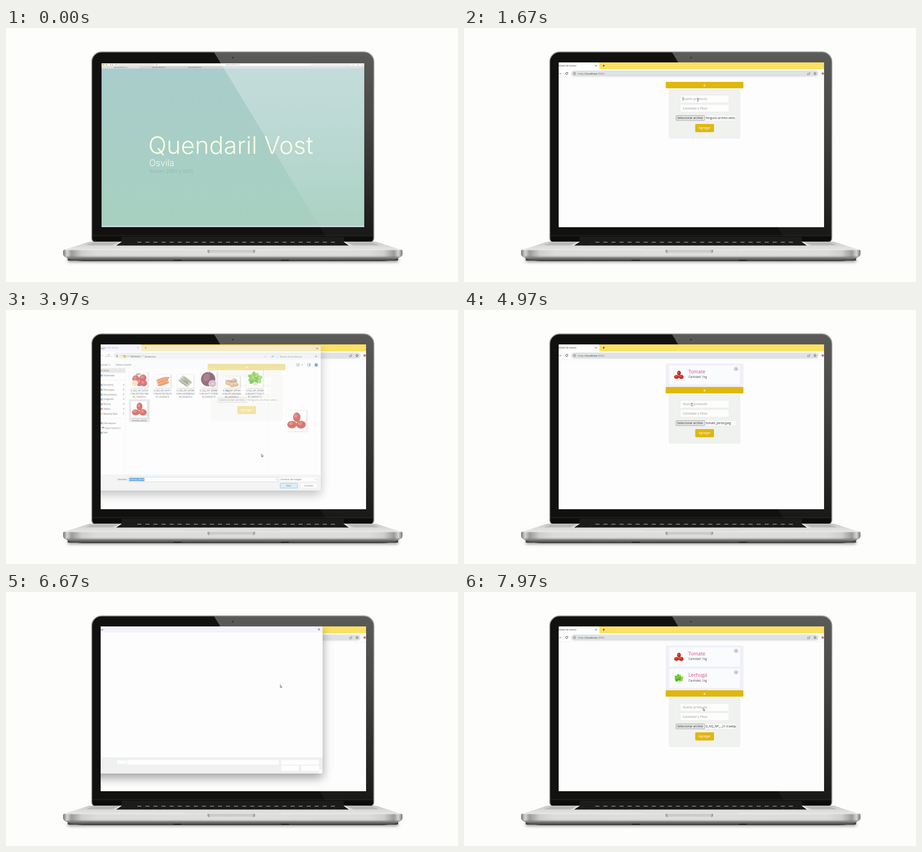
Write an HTML page with a canvas that moves like this. It is 998 px wide and 561 px high and loops after 8000 ms.

```html
<!DOCTYPE html>
<html lang="es">
<head>
<meta charset="utf-8">
<title>Listado de tareas</title>
<style>
html, body { margin: 0; width: 100%; height: 100%; overflow: hidden; background: #fdfdfc; }
canvas { display: block; width: 998px; height: 561px; }
</style>
</head>
<body>
<canvas id="stage"></canvas>
<script>
const W = 998, H = 561, LOOP = 8000;
const dpr = window.devicePixelRatio || 1;
const UI = '"Open Sans", "Noto Sans", sans-serif';
const THIN = 'Inter, Roboto, sans-serif';
const GOLD = '#e0b70e';

function prepare(canvas) {
  canvas.width = W * dpr;
  canvas.height = H * dpr;
  const ctx = canvas.getContext('2d');
  ctx.scale(dpr, dpr);
  return ctx;
}
const stage = prepare(document.getElementById('stage'));
const layer = document.createElement('canvas');
const layerCtx = prepare(layer);
let g = stage;

const clamp = v => Math.min(1, Math.max(0, v));
const phase = (t, a, b) => clamp((t - a) / (b - a));
const smooth = p => p * p * (3 - 2 * p);

function rect(x, y, w, h, fill, r = 0, stroke, lw = 0.6) {
  g.beginPath();
  g.roundRect(x, y, w, h, r);
  if (fill) { g.fillStyle = fill; g.fill(); }
  if (stroke) { g.strokeStyle = stroke; g.lineWidth = lw; g.stroke(); }
}
function poly(points, fill) {
  g.beginPath();
  points.forEach(([x, y]) => g.lineTo(x, y));
  g.closePath();
  g.fillStyle = fill;
  g.fill();
}
function line(color, lw, ...points) {
  g.beginPath();
  points.forEach(([x, y], i) => i ? g.lineTo(x, y) : g.moveTo(x, y));
  g.strokeStyle = color;
  g.lineWidth = lw;
  g.stroke();
}
function oval(x, y, rx, ry, fill, rot = 0) {
  g.beginPath();
  g.ellipse(x, y, rx, ry, rot, 0, Math.PI * 2);
  g.fillStyle = fill;
  g.fill();
}
function ring(x, y, r, color, lw, a = 0, b = Math.PI * 2) {
  g.beginPath();
  g.arc(x, y, r, a, b);
  g.strokeStyle = color;
  g.lineWidth = lw;
  g.stroke();
}
function text(s, x, y, size, color, align = 'left', weight = 400, family = UI) {
  g.font = `${weight} ${size}px ${family}`;
  g.textAlign = align;
  g.textBaseline = 'alphabetic';
  g.fillStyle = color;
  g.fillText(s, x, y + size * 0.36);
}
function ramp(x0, y0, x1, y1, ...stops) {
  const grad = g.createLinearGradient(x0, y0, x1, y1);
  stops.forEach(([p, c]) => grad.addColorStop(p, c));
  return grad;
}
function chevron(x, y, color = '#555') {
  line(color, 0.6, [x - 1.6, y - 0.8], [x, y + 0.8], [x + 1.6, y - 0.8]);
}
function arrowIcon(x, y, dx, dy, color) {
  line(color, 0.7, [x - 2.6 * dx, y - 2.6 * dy], [x + 2.6 * dx, y + 2.6 * dy]);
  const tx = x + 2.6 * dx, ty = y + 2.6 * dy;
  line(color, 0.7, [tx - 2 * dx + 2 * dy, ty - 2 * dy + 2 * dx], [tx, ty],
    [tx - 2 * dx - 2 * dy, ty - 2 * dy - 2 * dx]);
}
function cross(x, y, r, color, lw) {
  line(color, lw, [x - r, y - r], [x + r, y + r]);
  line(color, lw, [x + r, y - r], [x - r, y + r]);
}
function plus(x, y, r, color, lw) {
  line(color, lw, [x - r, y], [x + r, y]);
  line(color, lw, [x, y - r], [x, y + r]);
}
function reload(x, y, r, color, lw) {
  ring(x, y, r, color, lw, 0.4, 5.4);
  poly([[x + r + 0.5, y - r - 0.3], [x + r + 0.5, y - 0.3], [x + r - 2, y - 0.3]], color);
}

// Produce pictures, drawn in a box about 36 units wide around the centre.
const produce = {
  apple() {
    [[-8, -2, 8], [8, -4, 8], [0, 6, 9], [10, 8, 7.5]].forEach(([x, y, r]) => {
      oval(x, y, r, r * 0.95, '#c5283a');
      oval(x - r * 0.25, y - r * 0.25, r * 0.5, r * 0.4, '#dc5a58');
    });
    oval(-10, 8, 7, 7, '#eed9a4');
    line('#6b4a2a', 1, [-8, -9], [-6, -14]);
    oval(-2, -12, 5, 2, '#78a54a', -0.3);
  },
  carrot() {
    for (let i = 0; i < 5; i++) {
      oval(-1 + i * 0.9, -6 + i * 3.2, 15, 2.6, i % 2 ? '#f08a3c' : '#e2692a', -0.28);
    }
    oval(14, -8, 4, 2, '#6f9c4b', -0.5);
  },
  asparagus() {
    for (let i = 0; i < 6; i++) {
      oval(-6 + i * 2.3, 5 - i * 2.1, 15, 1.8, i % 2 ? '#a7b98a' : '#6d8560', 0.65);
    }
    oval(2, 2, 2, 6, '#8b567a', -0.8);
  },
  onion() {
    oval(-1, -1, 16, 16, '#5d1f38');
    oval(-5, -5, 7, 9, '#7d3b54', 0.5);
    oval(9, 9, 9, 8, '#ead3de');
    ring(9, 9, 6, '#93506f', 1.2);
    ring(9, 9, 3, '#93506f', 0.9);
    line('#a58369', 2, [0, -15], [3, -19]);
  },
  onions() {
    [[-8, 1, 8], [6, -3, 8], [2, 7, 7], [11, 6, 6]].forEach(([x, y, r]) => {
      oval(x, y, r, r * 0.85, '#d6a36e');
      oval(x - 2, y - 2, r * 0.5, r * 0.4, '#e8c59a');
    });
  },
  lettuce() {
    for (let i = 0; i < 17; i++) {
      const a = i * 2.4, r = 3.4 * Math.sqrt(i);
      oval(Math.cos(a) * r, Math.sin(a) * r * 0.75 - 1, 5.2, 4,
        ['#6fc22f', '#8fd749', '#4ea823'][i % 3], a);
    }
    oval(1, 11, 5, 4, '#cfe8a3');
  },
  tomato() {
    [[1, -7, 7, 9], [-8, 7, 9, 7], [9, 7, 9, 7.5]].forEach(([x, y, rx, ry]) => {
      oval(x, y, rx, ry, '#c92a22');
      oval(x - 2, y - 2, rx * 0.45, ry * 0.4, '#e2594a');
      oval(x + 1, y - ry * 0.75, 3.5, 1.1, '#52752f', 0.2);
    });
  }
};
function picture(kind, x, y, scale) {
  g.save();
  g.translate(x, y);
  g.scale(scale, scale);
  produce[kind]();
  g.restore();
}

function laptop() {
  g.fillStyle = '#fdfdfc';
  g.fillRect(0, 0, W, H);

  g.save();
  g.shadowColor = 'rgba(0,0,0,.55)';
  g.shadowBlur = 7 * dpr;
  g.shadowOffsetY = 2 * dpr;
  rect(136, 508, 730, 6, '#444', 3);
  g.restore();

  // Lid
  rect(189, 52.5, 623.5, 421, '#11110f', [22, 22, 9, 9], '#b4b4b2', 2);
  rect(191, 54.5, 619.5, 417, null, [20, 20, 7, 7], '#2a2a28', 1);
  glare(0.31, 190, 53.5, 811, 460);
  oval(501, 65.5, 2, 2, '#3d3d40');
  oval(501, 65.5, 0.9, 0.9, '#27293a');
  rect(191, 457.5, 620, 1, '#2f2f2d');
  rect(255, 461, 491, 11, '#1c1c1a');
  rect(192, 462, 63, 9, '#0c0c0a');
  rect(746, 462, 63, 9, '#0c0c0a');

  // Deck and keyboard
  poly([[184, 472], [817, 472], [873, 490], [128, 490]],
    ramp(0, 472, 0, 490, [0, '#c4c4c3'], [0.5, '#d9d9d8'], [1, '#e6e6e5']));
  poly([[194, 473.5], [247, 473.5], [235, 480], [176, 480]], '#b9b9b8');
  poly([[754, 473.5], [807, 473.5], [824, 480], [767, 480]], '#b9b9b8');
  poly([[252, 472], [749, 472], [762, 481], [239, 481]], '#e8e8e7');
  poly([[256, 472], [745, 472], [757, 480.5], [243, 480.5]], '#1b1b1a');
  for (let x = 290; x < 722; x += 17.8) rect(x, 472.5, 9, 1.2, '#b5b5b4');
  for (let x = 262; x < 740; x += 22) line('#3c3c3b', 0.6, [x, 474.5], [x - (501 - x) * 0.02, 480]);
  poly([[398, 481], [602, 481], [607, 490], [393, 490]], '#dededd');

  // Front edge
  g.beginPath();
  g.moveTo(128, 504);
  g.quadraticCurveTo(142, 514.5, 172, 515);
  g.lineTo(830, 515);
  g.quadraticCurveTo(860, 514.5, 873, 504);
  g.closePath();
  g.fillStyle = ramp(0, 504, 0, 515, [0, '#a2a2a1'], [0.5, '#6c6c6b'], [1, '#343433']);
  g.fill();
  rect(126, 489.5, 749.5, 16.5, ramp(126, 0, 875.5, 0,
    [0, '#777776'], [0.012, '#d5d5d4'], [0.025, '#9b9b9a'], [0.055, '#cfcfce'], [0.1, '#dcdcdb'],
    [0.5, '#dededd'], [0.9, '#dcdcdb'], [0.945, '#cfcfce'], [0.975, '#9b9b9a'], [0.988, '#d5d5d4'], [1, '#777776']),
    [4, 4, 7, 7]);
  rect(130, 489.5, 742, 1, '#f2f2f1');
  rect(134, 503.5, 734, 2.5, 'rgba(90,90,88,.25)', 2);
  rect(445, 490, 105, 8, ramp(445, 0, 550, 0, [0, '#8f8f8e'], [0.06, '#cbcbca'], [0.94, '#cbcbca'], [1, '#8f8f8e']), [0, 0, 5, 5]);
  rect(449, 496.5, 97, 1, '#ececeb');
  rect(370, 512, 18, 2, '#222');
  rect(607, 512, 18, 2, '#222');
}

function glare(alpha, left, top, right, bottom) {
  const edge = y => 459 + 0.606 * (y - 53);
  g.save();
  g.beginPath();
  g.roundRect(left, top, right - left, bottom - top, top < 60 ? [20, 20, 0, 0] : 0);
  g.clip();
  poly([[edge(top), top], [right, top], [right, bottom], [edge(bottom), bottom]],
    ramp(0, 53, 0, 460, [0, `rgba(255,255,255,${alpha})`], [0.35, `rgba(255,255,255,${alpha * 0.75})`],
      [1, `rgba(255,255,255,${alpha * 0.1})`]));
  g.restore();
}

function welcome() {
  rect(211, 78, 580, 361.5, ramp(0, 90, 0, 437, [0, '#a9cdcb'], [1, '#a7d0c0']));
  rect(211, 78, 580, 6, '#f3f3f3');
  rect(211, 84, 580, 5.5, '#d0d2d1');
  rect(211, 84, 84, 5.5, '#dededd');
  ['#f0605a', '#f4bd4f', '#5fc454'].forEach((c, i) => oval(214.5 + i * 3.8, 81, 1.3, 1.3, c));
  rect(246, 79, 82, 4, '#e4e4e4', 1);
  rect(333, 79, 338, 4, '#fff', 1);
  rect(674, 79, 88, 4, '#e4e4e4', 1);
  [230, 234, 242, 331, 766, 776, 786].forEach(x => rect(x, 80, 1.8, 2, '#999'));
  text('www.yourwebsite.com', 501, 81, 2.9, '#444', 'center');
  [253, 337, 417].forEach(x => text('www.yourwebsite.com', x, 87, 2.8, '#555', 'center'));
  rect(211, 437, 580, 2.5, '#d9dfeb');
  text('Quendaril Vost', 314, 258.5, 53.5, '#fbfbe6', 'left', 300, THIN);
  text('Osvila', 316, 298, 19.5, '#fbfbea', 'left', 300, THIN);
  text('Screen 2880 x 1800', 316.5, 316, 10.3, '#8fb2ae', 'left', 300, THIN);
  glare(0.33, 211, 78, 791, 440);
}

function browser() {
  rect(209, 76, 586, 364, '#fdfdfd');
  rect(209, 76, 586, 15, '#fbe164');
  rect(190, 76, 109, 18, '#fdfdfd', 4);
  text('Listado de tareas', 248, 83.3, 5.3, '#444', 'right');
  cross(291.5, 83.3, 1.6, '#333', 0.8);
  plus(308.5, 83.3, 2.6, '#333', 0.9);
  rect(209, 91, 586, 19, '#fdfdfd');
  line('#e7e8ea', 0.6, [209, 110], [795, 110]);
  arrowIcon(212, 100.5, 1, 0, '#888');
  reload(226.8, 100.5, 2.5, '#333', 1);
  rect(236.5, 94, 546.5, 13.5, '#dfe2e3', 6.7);
  ring(244, 100.6, 2.6, '#555', 0.7);
  line('#555', 0.7, [244, 100.2], [244, 102]);
  line('#555', 0.7, [244, 99], [244, 99.6]);
  text('http://', 251.5, 100.6, 6, '#666');
  const x1 = 251.5 + g.measureText('http://').width;
  text('localhost', x1, 100.6, 6, '#333');
  text(':3000', x1 + g.measureText('localhost').width, 100.6, 6, '#777');
  line('#666', 0.7, [758.5, 99.5], [758.5, 103.2], [763, 103.2], [763, 101.5]);
  line('#666', 0.7, [760, 101.6], [761, 99.6], [764, 99.3]);
  line('#666', 0.7, [762.5, 97.6], [764.2, 99.3], [762.5, 101]);
  g.beginPath();
  for (let i = 0; i < 10; i++) {
    const a = i * Math.PI / 5 - Math.PI / 2, r = i % 2 ? 1.4 : 3.2;
    g.lineTo(775 + r * Math.cos(a), 100.8 + r * Math.sin(a));
  }
  g.closePath();
  g.strokeStyle = '#444';
  g.lineWidth = 0.7;
  g.stroke();
  oval(792, 100.5, 2.6, 2.6, '#e0666e');
}

function card(y, name, kind) {
  rect(453, y, 156.5, 43, '#fafbfd', 3, '#eceef3');
  picture(kind, 474, y + 21.5, 0.6);
  text(name, 495.5, y + 14.3, 10.7, '#d6458f');
  text('Cantidad: 1kg', 495.5, y + 26, 6.4, '#444');
  oval(600.7, y + 8, 5.3, 5, '#dbd6e2');
  text('x', 600.7, y + 7.7, 6, '#7c4265', 'center');
}

function field(y, value, hint, caret) {
  rect(477.3, y, 107.8, 17.2, '#fdfdfc', 1.8, '#dfe0e0');
  text(value || hint, 483, y + 8.5, 7.2, value ? '#444' : '#92969a');
  if (caret) {
    const x = 483.5 + (value ? g.measureText(value).width : 0);
    line('#333', 0.7, [x, y + 4], [x, y + 13]);
  }
}

const typed = (t, s, a, b) => s.slice(0, Math.floor(s.length * phase(t, a, b) + 1e-6));

function page(t) {
  const count = (t >= 4400) + (t >= 7800);
  const dy = [0, 51, 98][count];
  if (count) {
    rect(445.3, 118, 171.7, dy + 5, '#eff0f9', 2);
    card(122, 'Tomate', 'tomato');
    if (count > 1) card(169.2, 'Lechuga', 'lettuce');
  }
  rect(445.3, 119 + dy, 171.7, 14.3, GOLD, 2.5);
  plus(531, 127 + dy, 2.5, '#fff', 1);
  if (t < 1150) return;

  let name = '', qty = '';
  if (t < 4400) {
    name = typed(t, 'Tomate', 1750, 2000);
    qty = typed(t, '1kg', 2150, 2300);
  } else if (t < 7800) {
    name = typed(t, 'Lechuga', 5150, 5480);
    qty = typed(t, '1kg', 5750, 6000);
  }
  const within = (a, b) => t >= a && t < b;
  rect(453, 137.3 + dy, 156.5, 106.5, '#f0f2ef', 3.5, '#dfe2e6');
  field(148.2 + dy, name, 'Nuevo producto', within(1600, 2080) || within(5000, 5600));
  field(168.6 + dy, qty, 'Cantidad o Peso', within(2080, 2460) || within(5600, 6400));
  rect(467.3, 192.6 + dy, 133.5, 12.4, '#f9faf9', 2, '#e2e4e5');
  rect(468.2, 193.4 + dy, 63.3, 10.8, '#e9e9ea', 1.4, '#777', 0.7);
  text('Seleccionar archivo', 470.7, 198.7 + dy, 6.4, '#222');
  const file = t < 4100 ? 'Ninguno archivo selec.' : t < 7640 ? 'tomate_perita.jpeg' : 'D_NQ_NP_...21-V.webp';
  text(file, 533.5, 198.7 + dy, 6.35, '#333');
  rect(510.5, 212 + dy, 41.5, 18, GOLD, 2.2);
  text('Agregar', 531.2, 220.8 + dy, 7.4, '#fff', 'center');
}

const files = [
  ['apple', 'D_NQ_NP_62334', '7-MLA477641786', '40_102021-V', 0],
  ['carrot', 'D_NQ_NP_65411', '7-MLA418278223', '07_052020-V', 4],
  ['asparagus', 'D_NQ_NP_85786', '5-MLA495986022', '09_042022-V', 4],
  ['onion', 'D_NQ_NP_89088', '3-MLA477177936', '54_092021-V', 0],
  ['onions', 'D_NQ_NP_89384', '6-MLA418265968', '02_052020-V', 6],
  ['lettuce', 'D_NQ_NP_99368', '0-MLA477176217', '87_092021-V', -2]
];
const side = [
  ['Inicio', 132], ['NubeVado', 143], ['Escritorio', 164.3], ['Descargas', 175], ['Documentos', 185.8],
  ['Imágenes', 196.5], ['Música', 207.3], ['Vídeos', 218], ['Bautista Roel', 228.7],
  ['Este equipo', 250], ['Disco local (C:)', 260.8], ['Red', 271.5]
];
const sideColors = ['#e0934a', '#2f86d6', '#3aa0d8', '#3a9b74', '#6f8fae', '#3f8fd8', '#d8604a', '#8a58c0', '#f0c04a', '#4a90b8', '#555', '#3a8ec0'];

function thumb(kind, x, top, bottom, scale) {
  g.save();
  g.shadowColor = 'rgba(0,0,0,.3)';
  g.shadowBlur = 2.5 * dpr;
  g.shadowOffsetX = g.shadowOffsetY = 0.8 * dpr;
  rect(x - 18.5, top, 37, bottom - top, '#fff');
  g.restore();
  picture(kind, x, (top + bottom) / 2, scale);
}

function dialogBody(state) {
  const label = (s, x, y, color = '#222', align) => text(s, x, y, 5.1, color, align);
  rect(149, 76, 550, 325, '#fdfdfd', 3);
  rect(149, 76, 550, 13.5, '#f4f1fb', [3, 3, 0, 0]);
  label('Abrir', 215.3, 83, '#333', 'right');
  cross(691, 82.8, 2, '#222', 0.8);
  rect(149, 365, 550, 36, '#eff0f0', [0, 0, 3, 3]);
  if (state.loading) {
    [[245, 372, 20.5, 7.5], [267.5, 371, 335, 10.5], [607.5, 371, 83.5, 10.5], [607.5, 383.5, 39, 11.5],
      [652.5, 383.5, 39, 11.5], [691, 393, 7, 7]].forEach(b => rect(...b, '#fdfdfd'));
    return;
  }

  arrowIcon(217, 100.8, 1, 0, '#999');
  chevron(230.3, 100.8);
  arrowIcon(243, 100.8, 0, -1, '#333');
  rect(253.5, 93.8, 346.5, 14, '#fdfdfd', 1, '#e3e3e5');
  rect(257, 98.2, 6.6, 5.2, '#f3c44d', 0.8);
  rect(257, 97.4, 3, 2, '#dca22d', 0.6);
  label('›', 267, 100.5);
  label('Escritorio', 273, 100.8);
  label('›', 298.5, 100.5);
  label('productos', 305, 100.8);
  chevron(574.5, 100.8);
  reload(591, 100.8, 2, '#555', 0.6);
  rect(603.5, 93.8, 90.5, 14, '#fdfdfd', 1, '#e3e3e5');
  label('Buscar en productos', 608, 100.8, '#777');
  ring(688.6, 100.2, 1.6, '#444', 0.6);
  line('#444', 0.7, [687.4, 101.4], [685.6, 103.2]);

  rect(149, 112.5, 550, 14.3, '#f9fafb');
  label('Organizar', 222.5, 119.6, '#245', 'right');
  poly([[224.5, 118.8], [227.5, 118.8], [226, 120.6]], '#333');
  label('Nueva carpeta', 240, 119.6, '#245');
  rect(645.3, 117, 5.2, 4.6, null, 0.5, '#333', 0.7);
  poly([[655.8, 118.8], [658.8, 118.8], [657.3, 120.6]], '#333');
  rect(669.5, 117, 6, 5, '#fff', 0, '#246a9c', 0.8);
  rect(673, 117, 2.5, 5, '#56a3d4');
  oval(688.7, 119.4, 3.7, 3.7, '#0f75bd');
  text('?', 688.7, 119.3, 5, '#fff', 'center', 700);

  rect(149, 127, 112, 10.3, '#dcdcdc');
  side.forEach(([name, y], i) => {
    rect(i === 10 ? 208.5 : 206, y - 2, i === 10 ? 5.5 : 4, i === 10 ? 2.5 : 4.5, sideColors[i]);
    label(name, i === 10 ? 216 : 212, y);
    if (i > 1 && i < 9) {
      oval(257.6, y - 0.6, 1.5, 1, '#777', -0.8);
      line('#777', 0.6, [257, y], [255.3, y + 1.8]);
    }
  });
  [153.5, 239.3].forEach(y => line('#e4e4e4', 0.7, [149, y], [257, y]));
  line('#ececec', 0.7, [261.5, 127], [261.5, 365]);

  if (state.hover >= 0) rect(269 + state.hover * 51.7, 129.5, 47, 66.5, '#e4f1fb');
  if (state.pick === 'lettuce') rect(527.5, 129.5, 47, 66.5, '#d9e6ef');
  files.forEach(([kind, a, b, c, drop], i) => {
    const x = 292.5 + i * 51.7;
    thumb(kind, x, 134 + drop * 1.9, 171, drop > 0 ? 0.9 : 1);
    [a, b, c].forEach((s, k) => label(s, x, 177 + k * 7.2, '#222', 'center'));
  });
  if (state.pick === 'tomato') rect(269.5, 196.5, 46.5, 51.5, '#dfe1e1');
  thumb('tomato', 292, 200.5, 238, 0.95);
  label('tomate_perita', 292.5, 244.2, '#222', 'center');

  if (state.pick) {
    line('#f0f0f0', 0.7, [582, 127], [582, 365]);
    g.save();
    g.translate(644, 245);
    g.scale(1.25, 1.25);
    thumb(state.pick, 0, -18.7, 18.7, 0.95);
    g.restore();
  } else {
    label('Seleccione el archivo del que desea obtener la', 641, 242.3, '#777', 'center');
    label('vista previa.', 641, 249.6, '#777', 'center');
  }

  label('Nombre:', 265, 376.3, '#222', 'right');
  rect(267.3, 371.2, 335.4, 10.3, '#fdfdfd', 0.5, '#80b4d0');
  chevron(598.7, 376.5);
  if (state.pick) {
    const s = state.pick === 'tomato' ? 'tomate_perita' : 'D_NQ_NP_993680-MLA47717621787_092021-V';
    g.font = `400 5.1px ${UI}`;
    rect(269.5, 372.8, g.measureText(s).width + 1, 7.2, '#1b79c6');
    label(s, 270, 376.3, '#fff');
  }
  rect(607.5, 371.2, 83.8, 10.3, '#fdfdfd', 0.5, '#d7d7d7');
  label('Archivos de imagen', 609.3, 376.4);
  chevron(688, 376.5);
  rect(608.2, 384.6, 38.6, 11, state.press ? '#c9e6f7' : '#fdfdfd', 1, '#3d93c8', 0.8);
  label('Abrir', 627.5, 390.1, '#222', 'center');
  rect(653, 384.6, 38.5, 11, '#fdfdfd', 1, '#d2d2d2');
  label('Cancelar', 672.2, 390.1, '#222', 'center');
  for (let i = 0; i < 3; i++) rect(697 - i * 1.4, 396 + i * 1.4, 0.8, 0.8, '#bbb');
}

const sessions = [
  { open: 2490, ready: 2650, pickAt: 3220, pick: 'tomato', press: 3800, close: 3880, gone: 4130, hoverFrom: 2830, hoverTo: 3010, hover: 0 },
  { open: 6530, ready: 6780, pickAt: 7080, pick: 'lettuce', press: 7400, close: 7470, gone: 7660, hoverFrom: 6950, hoverTo: 7080, hover: 5 }
];

function dialog(t) {
  const s = sessions.find(d => t >= d.open && t < d.gone);
  if (!s) return;
  const shown = smooth(phase(t, s.open, s.open + 130));
  const leaving = phase(t, s.close, s.gone);
  const scale = (0.96 + 0.04 * shown) * (1 - 0.04 * leaving);
  g = layerCtx;
  g.clearRect(0, 0, W, H);
  g.save();
  g.shadowColor = 'rgba(0,0,0,.38)';
  g.shadowBlur = 22 * dpr;
  g.shadowOffsetY = 9 * dpr;
  rect(149, 76, 550, 325, '#fff', 3);
  g.restore();
  dialogBody({
    loading: t < s.ready,
    pick: t >= s.pickAt ? s.pick : null,
    press: t >= s.press,
    hover: t >= s.hoverFrom && t < s.hoverTo ? s.hover : -1
  });
  g = stage;
  g.save();
  g.globalAlpha = shown * (1 - leaving);
  g.translate(424, 238);
  g.scale(scale, scale);
  g.drawImage(layer, -424, -238, W, H);
  g.restore();
}

// Pointer stops: time, x, y
const stops = [
  [500, 650, 330], [1000, 531, 127], [1200, 531, 127], [1500, 516.5, 158.5], [1980, 516.5, 158.5],
  [2080, 514, 178], [2250, 514, 178], [2400, 500, 198], [2520, 500, 198], [2940, 302, 195],
  [3120, 293, 222], [3280, 293, 222], [3720, 626, 388], [3870, 626, 388], [3970, 564, 318],
  [4180, 531, 221], [4450, 531, 221], [4900, 503.5, 209], [5500, 503.5, 209], [5620, 503.5, 229],
  [6050, 503.5, 229], [6350, 500, 249], [6490, 500, 249], [6670, 605.5, 205], [6980, 551, 158],
  [7120, 551, 158], [7360, 627, 389], [7480, 627, 389], [7700, 531, 272], [7820, 531, 272], [7970, 528, 256]
];

function pointer(t) {
  let i = stops.findIndex(s => s[0] > t);
  if (i < 0) i = stops.length;
  const a = stops[Math.max(0, i - 1)], b = stops[Math.min(stops.length - 1, i)];
  const p = a === b ? 0 : smooth(phase(t, a[0], b[0]));
  const x = a[1] + (b[1] - a[1]) * p, y = a[2] + (b[2] - a[2]) * p;
  if ((t > 1450 && t < 2290) || (t > 4820 && t < 6150)) {
    line('#222', 0.7, [x, y - 3], [x, y + 3]);
    line('#222', 0.7, [x - 1.3, y - 3], [x + 1.3, y - 3]);
    line('#222', 0.7, [x - 1.3, y + 3], [x + 1.3, y + 3]);
    return;
  }
  const shape = [[0, 0], [0, 6], [1.3, 4.8], [2.3, 6.9], [3.2, 6.5], [2.3, 4.4], [4.1, 4.3]];
  poly(shape.map(([u, v]) => [x + u, y + v]), '#fff');
  g.strokeStyle = '#222';
  g.lineWidth = 0.6;
  g.stroke();
}

function draw(t) {
  laptop();
  const fade = smooth(phase(t, 200, 700));
  if (fade < 1) welcome();
  if (fade > 0) {
    g.save();
    g.beginPath();
    g.rect(209, 76, 586, 364);
    g.clip();
    g.globalAlpha = fade;
    browser();
    page(t);
    dialog(t);
    pointer(t);
    g.restore();
  }
}

const start = performance.now();
function tick() {
  draw((performance.now() - start) % LOOP);
  requestAnimationFrame(tick);
}
tick();
</script>
</body>
</html>
```
